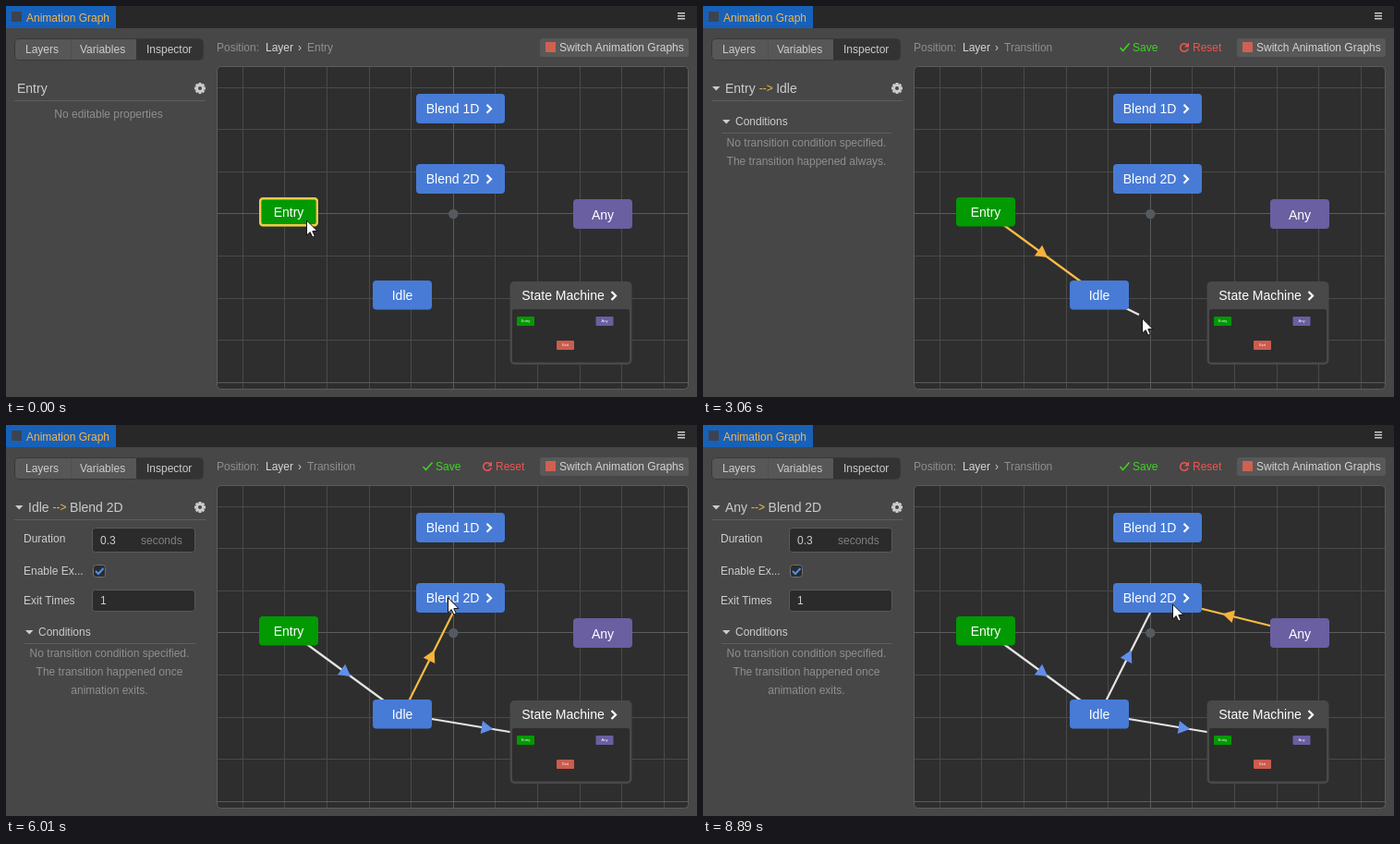
Animation of 748x423 px, one loop 9.35 s. Source, as an HTML page with a canvas:

```html
<!DOCTYPE html>
<html lang="en">
<head>
<meta charset="utf-8">
<title>Animation Graph</title>
<style>
html, body { margin: 0; width: 100%; height: 100%; overflow: hidden; background: #474747; }
canvas { display: block; width: 748px; height: 423px; }
</style>
</head>
<body>
<canvas id="stage" width="748" height="423"></canvas>
<script>
const ctx = document.getElementById('stage').getContext('2d');
const LOOP = 9350;
const SANS = '"Liberation Sans", Arial, sans-serif';
const MENU_FONT = '"Open Sans", "Noto Sans", sans-serif';
const LIGHT = '#cccccc', DIM = '#8f8f8f', GOLD = '#f8bd45', BLUE = '#477bd6';
const GREEN = '#029902', PURPLE = '#695fa1';

// x, y, w, h, colour, label x
const nodes = {
  'Blend 1D': { box: [444, 95, 96, 32], color: BLUE, more: true },
  'Blend 2D': { box: [444, 171, 96, 32], color: BLUE, more: true },
  'Entry': { box: [274, 207, 64, 31.5], color: GREEN },
  'Any': { box: [614, 209, 64, 32], color: PURPLE },
  'Idle': { box: [397, 297, 64, 31.5], color: BLUE },
  'State Machine': { box: [545.5, 298, 132, 90] }
};

const links = [
  { from: 'Entry', to: 'Idle', drag: 715, made: 1420 },
  { from: 'Idle', to: 'State Machine', drag: 3060, made: 3750 },
  { from: 'Idle', to: 'Blend 2D', drag: 5235, made: 6010 },
  { from: 'Any', to: 'Blend 2D', drag: 8108, made: 8890 }
];

// first step, last step, step count, destination
const moves = [
  [320, 470, 3, 346, 250],
  [795, 1250, 7, 427, 317],
  [1570, 1650, 2, 431, 317],
  [2270, 2440, 3, 474, 337],
  [3060, 3060, 1, 475, 338],
  [3137, 3520, 6, 576, 311],
  [3980, 4380, 6, 435, 311],
  [4760, 4930, 3, 455, 321],
  [5235, 5780, 8, 478, 187],
  [6087, 6550, 7, 636, 222],
  [7480, 7650, 3, 653, 243],
  [8108, 8580, 7, 508, 194]
];

const clicks = [[640, 715], [1250, 1420], [2740, 2910], [3600, 3750], [5160, 5235],
  [5860, 6010], [6700, 6790], [8030, 8108], [8730, 8890]];

const stateItems = ['Add Transition', 'Copy', 'Duplicate', 'Delete'];
const menus = [
  { on: 170, off: 715, x: 324, y: 232, w: 123, items: ['Add Transition'] },
  { on: 2050, off: 3060, x: 431, y: 317, w: 170, items: stateItems },
  { on: 4610, off: 5235, x: 434, y: 311, w: 170, items: stateItems },
  { on: 7340, off: 8108, x: 635, y: 222, w: 123, items: ['Add Transition'] }
];

const within = (t, a, b) => t >= a && t < b;

function pointer(t) {
  let x = 325, y = 232;
  for (const [first, last, count, tx, ty] of moves) {
    if (t < first) break;
    const gap = (last - first) / Math.max(1, count - 1);
    const step = gap ? Math.min(count, Math.floor((t - first) / gap + 1e-6) + 1) : 1;
    const k = step / count, ease = k * k * (3 - 2 * k);
    x += (tx - x) * ease;
    y += (ty - y) * ease;
  }
  return { x, y };
}

function box(x, y, w, h, r, fill, stroke, weight = 1) {
  ctx.beginPath();
  ctx.roundRect(x, y, w, h, r);
  if (fill) { ctx.fillStyle = fill; ctx.fill(); }
  if (stroke) { ctx.strokeStyle = stroke; ctx.lineWidth = weight; ctx.stroke(); }
}

function path(points, color, weight, closed) {
  ctx.beginPath();
  points.forEach(([x, y]) => ctx.lineTo(x, y));
  if (closed) { ctx.closePath(); ctx.fillStyle = color; ctx.fill(); return; }
  ctx.strokeStyle = color;
  ctx.lineWidth = weight;
  ctx.stroke();
}

function disc(x, y, r, color) {
  ctx.beginPath();
  ctx.arc(x, y, r, 0, Math.PI * 2);
  ctx.fillStyle = color;
  ctx.fill();
}

// y is the vertical middle of the capitals
function text(str, x, y, color = LIGHT, size = 12, align = 'left', family = SANS) {
  ctx.font = size + 'px ' + family;
  ctx.textAlign = align;
  ctx.fillStyle = color;
  ctx.fillText(str, x, Math.round(y + size * 0.36));
  return ctx.measureText(str).width;
}

const rule = (x1, x2, y) => path([[x1, y + .5], [x2, y + .5]], '#5e5e5e', 1);
const fold = (x, y) => path([[x - 4, y - 2], [x + 4.5, y - 2], [x + .25, y + 2.5]], LIGHT, 0, true);
const chevron = (x, y) => path([[x, y - 4.5], [x + 4.5, y], [x, y + 4.5]], '#fff', 2.2);

function gear(x, y) {
  ctx.save();
  ctx.translate(x, y);
  ctx.fillStyle = LIGHT;
  for (let i = 0; i < 4; i++) {
    ctx.fillRect(-6, -1.5, 12, 3);
    ctx.rotate(Math.PI / 4);
  }
  ctx.restore();
  ctx.beginPath();
  ctx.arc(x, y, 3.4, 0, Math.PI * 2);
  ctx.strokeStyle = LIGHT;
  ctx.lineWidth = 2.6;
  ctx.stroke();
  disc(x, y, 2, '#474747');
}

function drawFrame(edited, place) {
  ctx.fillStyle = '#474747';
  ctx.fillRect(0, 0, 748, 423);
  ctx.fillStyle = '#282828';
  ctx.fillRect(0, 0, 748, 24);
  ctx.fillStyle = '#1761b9';
  ctx.fillRect(0, 0, 119, 24);
  ctx.fillStyle = '#3c4350';
  ctx.fillRect(6, 6, 11, 11);
  text('Animation Graph', 22, 13, '#f5b54a');
  for (const y of [7, 10, 13]) {
    ctx.fillStyle = LIGHT;
    ctx.fillRect(727, y, 8, 1.5);
  }

  box(9.5, 35.5, 204, 23, 4, '#575757', '#383838');
  box(141, 36, 72, 22, [0, 3, 3, 0], '#333333');
  path([[70.5, 36], [70.5, 58]], '#505050', 1);
  text('Layers', 21, 47);
  text('Variables', 80, 47);
  text('Inspector', 152, 47);

  text('Position:', 228, 45, DIM);
  text('Layer', 281, 45, '#d6d6d6');
  text('›', 316, 45);
  text(place, 326, 45, DIM);

  box(578, 35, 161, 20, 3, '#585858');
  ctx.fillStyle = '#cf6151';
  ctx.fillRect(584, 39, 11, 11);
  text('Switch Animation Graphs', 599, 45, '#d4d4d4');

  if (edited) {
    const red = '#ee5550', green = '#3fd423';
    path([[451.5, 45], [454.5, 48.5], [461.5, 40.5]], green, 1.5);
    text('Save', 465, 45, green);
    ctx.beginPath();
    ctx.arc(521, 45, 4.3, .3, 5.5);
    ctx.strokeStyle = red;
    ctx.lineWidth = 1.6;
    ctx.stroke();
    path([[526, 39.5], [526, 44.5], [521, 44.5]], red, 0, true);
    text('Reset', 530, 45, red);
  }
}

function field(y, h, value) {
  box(93.5, y + .5, 111, h, 3, '#2b2b2b', '#5a5a5a');
  text(value, 102, y + h / 2 + .5);
}

function drawInspector(link, name) {
  gear(210, 89);
  rule(9, 216, 102);
  if (!link) {
    text(name, 12, 89, LIGHT, 14);
    text('No editable properties', 111, 117, DIM, 12, 'center');
    return;
  }
  fold(14, 89);
  let x = 24 + text(link.from, 24, 89, LIGHT, 14) + 4;
  x += text('-->', x, 89, GOLD) + 3.5;
  text(link.to, x, 89, LIGHT, 14);

  const entry = link.from === 'Entry';
  const top = entry ? 125 : 224;
  if (!entry) {
    text('Duration', 19, 123);
    field(111, 26, '0.3');
    text('seconds', 146, 125, '#808080');
    text('Enable Ex...', 19, 158);
    box(94.5, 151.5, 13, 13, 3, '#2b2b2b', '#707070');
    path([[97, 158], [100, 161], [105.5, 155]], '#4a90f0', 2);
    text('Exit Times', 19, 190);
    field(178, 23, '1');
  }
  fold(25, top);
  text('Conditions', 35, top);
  rule(20, 205, top + 12);
  const lines = ['No transition condition specified.'].concat(entry
    ? ['The transition happened always.']
    : ['The transition happened once', 'animation exits.']);
  lines.forEach((line, i) => text(line, 112, top + 23 + i * 20, DIM, 12, 'center'));
}

function drawGrid() {
  box(228.5, 65.5, 510, 349, 4, '#2e2e2e', '#5c5c5c');
  for (let i = -5; i <= 5; i++) {
    const x = Math.floor(484.3 + i * 45.6) + .5;
    path([[x, 66], [x, 414]], i ? '#4a4a4a' : '#5c5c5c', 1);
  }
  for (let i = -3; i <= 4; i++) {
    const y = Math.floor(224.8 + i * 45.6) + .5;
    path([[229, y], [738, y]], i % 4 ? '#4a4a4a' : '#5c5c5c', 1);
  }
  disc(484.3, 225, 5.2, '#555a60');
}

function center(name) {
  const [x, y, w, h] = nodes[name].box;
  return [x + w / 2, y + h / 2];
}

function drawLink([x1, y1], [x2, y2], active) {
  path([[x1, y1], [x2, y2]], active ? GOLD : '#e4e4e4', 2.2);
  ctx.save();
  ctx.translate((x1 + x2) / 2, (y1 + y2) / 2);
  ctx.rotate(Math.atan2(y2 - y1, x2 - x1));
  path([[7, 0], [-5.5, -7], [-5.5, 7]], active ? '#f6b23c' : '#628eea', 0, true);
  ctx.restore();
}

function tag(label, x, y, color) {
  box(x, y, 19, 10, 1, color);
  text(label, x + 9.5, y + 5, '#fff', 4, 'center');
}

function drawNodes(selected) {
  for (const [name, { box: [x, y, w, h], color, more }] of Object.entries(nodes)) {
    if (!color) continue;
    box(x, y, w, h, 4, color);
    if (name === selected) box(x + 1.2, y + 1.2, w - 2.4, h - 2.4, 3, null, '#f7c64c', 2.4);
    const cx = x + w / 2 - (more ? 8.5 : 0), cy = y + (name === 'Any' ? 16.5 : 15.8);
    text(name, cx, cy, '#fff', 14, 'center');
    if (more) chevron(520.5, cy + .5);
  }
  const [x, y, w, h] = nodes['State Machine'].box;
  box(x, y, w, h, 5, '#494949');
  box(x + 2.5, y + 30, w - 5, h - 32.5, 2, '#2d2d2d');
  text('State Machine', 603, 313, '#fff', 14, 'center');
  chevron(655.5, 313.5);
  tag('Entry', 553, 336, GREEN);
  tag('Any', 638.5, 336, PURPLE);
  tag('Exit', 596, 362, '#cb5c4e');
}

function drawMenu({ x, y, w, items }, p) {
  const h = items.length > 1 ? 103 : 31;
  const row = (h - 8) / items.length;
  ctx.fillStyle = '#fbfbfb';
  ctx.fillRect(x, y, w, h);
  items.forEach((item, i) => {
    const top = y + 4 + i * row;
    if (p.y > top && p.y < top + row) {
      ctx.fillStyle = '#e4e4e4';
      ctx.fillRect(x + 3, top, w - 6, row);
    }
    text(item, x + 25, top + row / 2, '#222', 11.2, 'left', MENU_FONT);
  });
}

function drawPointer({ x, y }) {
  ctx.save();
  ctx.translate(x + .5, y);
  ctx.beginPath();
  [[0, 0], [0, 16], [3.7, 12.6], [6.3, 18.2], [8.8, 17.1], [6.3, 11.6], [11.4, 11.4]]
    .forEach(([px, py]) => ctx.lineTo(px, py));
  ctx.closePath();
  ctx.fillStyle = '#fff';
  ctx.fill();
  ctx.strokeStyle = '#111';
  ctx.lineWidth = 1;
  ctx.stroke();
  ctx.restore();
}

function draw(t) {
  const p = pointer(t);
  const made = links.filter(l => t >= l.made);
  const picked = t < 1420 ? 'Entry' : within(t, 6700, 8890) ? 'Any' : null;
  const active = picked ? null : made[made.length - 1];

  drawFrame(made.length > 0, picked || 'Transition');
  drawInspector(active, picked);
  drawGrid();
  made.forEach(l => drawLink(center(l.from), center(l.to), l === active));
  const drag = links.find(l => within(t, l.drag, l.made));
  if (drag) drawLink(center(drag.from), [p.x - 3, p.y - 4], false);
  drawNodes(picked);

  const menu = menus.find(m => within(t, m.on, m.off));
  if (menu) drawMenu(menu, p);
  if (clicks.some(([a, b]) => within(t, a, b))) {
    disc(p.x + 8.5, p.y + 8.5, 29.5, 'rgba(235, 5, 5, .53)');
  }
  drawPointer(p);
}

const start = performance.now();
function tick() {
  draw((performance.now() - start) % LOOP);
  requestAnimationFrame(tick);
}
tick();
</script>
</body>
</html>
```
